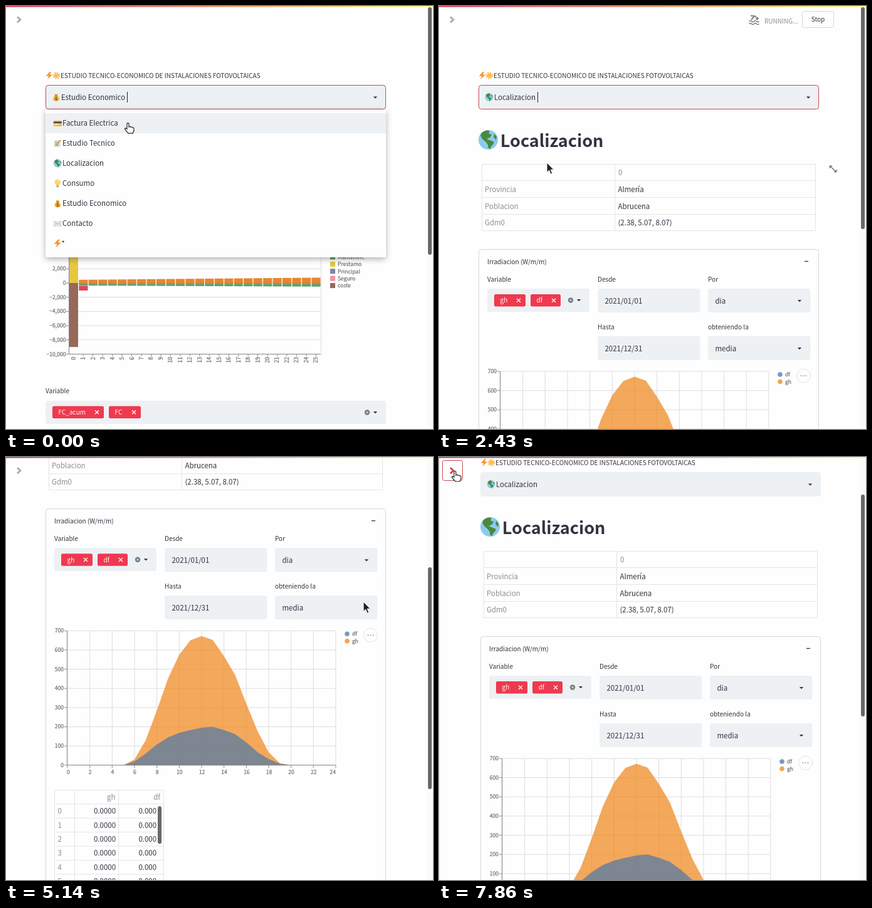
Write an HTML page that moves like this. It is 681 by 675 pixels and loops after 8000 ms.

```html
<!DOCTYPE html>
<html lang="es">
<head>
<meta charset="utf-8">
<title>Estudio</title>
<style>
html, body { margin: 0; width: 100%; height: 100%; overflow: hidden; background: #fefefe; }
svg { display: block; width: 681px; height: 675px; }
text { font: 11.46px "Noto Sans CJK JP", "Noto Sans CJK SC", "Noto Sans CJK KR", "Noto Sans", sans-serif; fill: #31333f; white-space: pre; }
.s { font-size: 10.03px; }
.h { font-size: 27px; font-weight: 700; }
.c { font-size: 8.6px; font-weight: 500; fill: #6a6a6a; stroke: #6a6a6a; stroke-width: .2px; }
.g { fill: #8b8c94; }
.w { fill: #fff; }
.e { text-anchor: end; }
.m { text-anchor: middle; }
</style>
</head>
<body>
<svg id="stage" viewBox="0 0 681 675" xmlns="http://www.w3.org/2000/svg"></svg>
<script>
const FIELD = '#edf1f3', RED = '#ef394f', FOCUS = '#cb4651', BLUE = '#4c78a8', ORANGE = '#f08519';

// ---- drawing helpers, all return markup ----
const text = (x, y, s, cls = '') => `<text x="${x}" y="${y}" class="${cls}">${s}</text>`;
const rect = (x, y, w, h, fill, more = '') => `<rect x="${x}" y="${y}" width="${w}" height="${h}" fill="${fill}" ${more}/>`;
const path = (d, stroke, w = 1, more = 'fill="none"') => `<path d="${d}" stroke="${stroke}" stroke-width="${w}" ${more}/>`;
const group = (id, body, more = '') => `<g id="${id}" ${more}>${body}</g>`;
const dot = (x, y, r, fill, more = '') => `<circle cx="${x}" cy="${y}" r="${r}" fill="${fill}" ${more}/>`;
const range = (n, f) => Array.from({ length: n }, (_, i) => f(i)).join('');
const caretDown = (x, y) => `<path d="M${x - 3.2} ${y - 1.6}h6.4l-3.2 3.4z" fill="#31333f"/>`;
const cross = (x, y, r, color, w) => path(`M${x - r} ${y - r}l${2 * r} ${2 * r}m0 ${-2 * r}l${-2 * r} ${2 * r}`, color, w);
const clear = (x, y) => dot(x, y, 4.2, '#777a82') + cross(x, y, 1.5, '#fff', 1);
const field = (x, y, w, h) => rect(x, y, w, h, FIELD, 'rx="3"');
const tag = (x, y, w, s) => rect(x, y, w, 19.5, RED, 'rx="2.5"') + text(x + 9.5, y + 13.3, s, 's w') + cross(x + w - 11, y + 9.8, 3, '#fff', 1.3);
const menu = (x, y) => dot(x, y, 11, '#fefefe', 'stroke="#e3e3e3"') + [-4, 0, 4].map(d => dot(x + d, y, 1.1, '#aaa')).join('');
const chartLegend = (x, y, names) => names.map((s, i) =>
  dot(x, y + i * 11.5, 3.8, i ? ORANGE : BLUE, 'opacity=".75"') + text(x + 8, y + i * 11.5 + 3, s, 'c')).join('');
const area = (pts, base, fill) =>
  `<path d="M${pts[0][0]} ${base}L${pts.map(p => p.map(v => v.toFixed(1)).join(' ')).join('L')}L${pts[pts.length - 1][0]} ${base}Z" fill="${fill}" opacity=".7"/>`;
const number = v => (v < 0 ? '−' : '') + Math.abs(v).toLocaleString('en-US');

// ---- pictograms on a 16 unit square ----
const icons = {
  bolt: '<path d="M9 0L1 9h6L4 16 15 6H9l3-6z" fill="#f7932b"/>',
  sun: dot(8, 8, 6.2, 'none', 'stroke="#f2a33a" stroke-width="2.6" stroke-dasharray="2.4 2.47"') + dot(8, 8, 4, '#fcc63c', 'stroke="#f2a33a"'),
  card: rect(0, 3, 16, 11, '#f3b544', 'rx="1.4"') + rect(0, 5, 16, 3, '#5a4238') + rect(2, 9.5, 8, 1.6, '#fff'),
  memo: rect(1, 2, 12, 13, '#d5dde1', 'rx="1"') + path('M3 6h8M3 9h7M3 12h8', '#7d98a8') + path('M5 12L14 2', '#f0922d', 2.6),
  globe: dot(8, 8, 8, '#8bcbee') + '<path d="M2.5 2.4Q6-.4 9 .5L8.5 3 11 3.6 9.5 6 6.8 7.2 9 8.3 12.5 9.6Q13 11.5 11 12.6L9.4 15.6Q7.6 15 7.7 12L5.7 9.6 3.2 7.4 1.6 4.6zM13 3l2 2.5-.6 2.6-2-2.4z" fill="#4b8a3b"/>',
  bulb: dot(8, 6, 5.8, '#fad96f') + rect(5.4, 10, 5.2, 2.4, '#f2c24c') + rect(5.6, 12.2, 4.8, 3.6, '#a3abb0', 'rx="1"'),
  bag: '<path d="M5 1l3 1 3-1-.8 4Q15 9 14 13q-1 3-6 3t-6-3Q1 9 5.800 5z" fill="#f0b541"/>' + path('M5 5h6', '#a5692b', 1.4) + path('M10 8.500Q6 7.500 6.200 9.500T9.700 12 6 13.500M8 7v8', '#7a4a22', 1.1),
  mail: rect(0, 3, 16, 11, '#dfe7eb', 'rx="1"') + path('M0 3.500L8 9.500 16 3.500M0 14L5.800 8M16 14L10.200 8', '#9db4c0')
};
const icon = (name, x, y, size) => `<g transform="translate(${x} ${y}) scale(${size / 16})">${icons[name]}</g>`;

// ---- page header ----
const selectBox = group('select', rect(63.5, 126.5, 542, 38, FIELD, 'id="frame" rx="4"') + caretDown(589, 146) +
  group('pickOld', icon('bag', 73.5, 139, 13) + text(87.9, 150, 'Estudio Economico')) +
  group('pickNew', icon('globe', 73.5, 139, 13) + text(87.9, 150, 'Localizacion')) +
  rect(0, 137, 1, 17, '#222', 'id="caret"'));
const header = icon('bolt', 63, 105, 12) + icon('sun', 74.500, 105, 12) +
  text(87, 115, 'ESTUDIO TECNICO-ECONOMICO DE INSTALACIONES FOTOVOLTAICAS', 's') + selectBox;

// ---- cash flow bars ----
const barY = v => 442 - v * .01135;
function barChart() {
  const step = 402 / 26;
  let out = range(10, i => {
    const v = 8000 - 2000 * i, y = barY(v);
    return path(`M100 ${y}H502`, '#ddd') + path(`M96 ${y}h4`, '#888') + text(95.5, y + 3, number(v), 'c e');
  });
  out += path('M502.500 351V555', '#ddd');
  out += range(26, i => {
    const x = 100.8 + i * step, w = 14.2, top = 437 - i * .14;
    const label = `<text class="c e" transform="translate(${x + 10} 560) rotate(-90)">${i}</text>`;
    if (!i) return rect(x, 401, w, 41, '#e6c743') + rect(x, 442, w, barY(-9000) - 442, '#97695a') + label;
    return rect(x, top, w, 442 - top, '#e8862f') + rect(x, 442, w, 1.8, '#8f8791') +
      rect(x, 443.8, w, 2.2 + i * .07, '#5ba065') + (i == 1 ? rect(x, 446.5, w, 7.5, '#e0455a') : '') +
      path(`M${x + 7} 555v4`, '#888') + label;
  });
  out += path('M100.500 351V555.500H502', '#888');
  const legend = { 'Mantenim.': '#54a24b', Prestamo: '#e8c53f', Principal: '#7f86a0', Seguro: '#f490a2', coste: '#97695a' };
  return out + Object.entries(legend).map(([s, c], i) =>
    rect(517, 396.5 + i * 11.4, 8, 8, c) + text(529, 403.7 + i * 11.4, s, 'c')).join('');
}

// ---- accumulated cash flow ----
function flowChart() {
  const X = i => 95.5 + i * 15.98, Y = v => 508 - v * .02683;
  const years = [...Array(26).keys()];
  const total = i => i ? -6150 + 250 * (i - 1) + 1.83 * (i - 1) ** 2 : -5400;
  const flow = i => i > 1 ? 200 - 6 * (i - 2) : i ? -750 : -5400;
  const lines = f => years.map(i => [X(i), Y(f(i))]);
  return range(9, i => {
    const v = 1000 - 1000 * i, y = Y(v);
    return path(`M95 ${y}H511`, '#ddd') + path(`M91 ${y}h4`, '#888') + text(90.5, y + 3, number(v), 'c e');
  }) + range(14, i => path(`M${X(2 * i)} 481V690`, '#ddd')) + path('M95.500 481V690', '#888') +
    area(lines(total), 508, ORANGE) + area(lines(flow), 508, BLUE) +
    chartLegend(530, 485.5, ['FC', 'FC_acum']) + menu(594.5, 487);
}
const flowPanel = text(63, 414, 'Variable', 's') + field(63, 426, 543, 37) + tag(74, 434.5, 82, 'FC_acum') +
  tag(164, 434.5, 51, 'FC') + clear(576, 444.5) + caretDown(589, 444.5) + flowChart();

// ---- location page ----
const place = icon('globe', 63, 198, 31) + text(97.8, 225, 'Localizacion', 'h') +
  path('M68.500 252.500H600.500V358.500H68.500zM68.500 278.500H600.500M68.500 305.500H600.500M68.500 332.500H600.500M280.500 252.500V358.500', '#e4e4e7') +
  text(286, 270, '0', 'g') +
  [['Provincia', 'Almería'], ['Poblacion', 'Abrucena'], ['Gdm0', '(2.38, 5.07, 8.07)']].map(([k, v], i) =>
    text(73, 297 + i * 26.6, k, 'g') + text(285.5, 297 + i * 26.6, v)).join('') +
  group('expand', path('M-4.500-4.500L4.500 4.500', '#777', 1.5) + '<path d="M-6-5.500h5l-5 5zM6 5.500h-5l5-5z" fill="#777"/>');

// ---- irradiation panel ----
const gh = [0, 0, 0, 0, 0, 0, 30, 130, 285, 452, 575, 650, 672, 652, 568, 470, 320, 178, 68, 10, 0];
const df = [0, 0, 0, 0, 0, 0, 20, 60, 108, 145, 168, 183, 195, 200, 183, 162, 118, 68, 32, 8, 0];
function sunChart() {
  const X = h => 98 + h * 17.83, Y = v => 797.5 - v * .3064;
  const curve = a => a.map((v, h) => [X(h), Y(v)]).slice(5);
  return range(8, i => path(`M98 ${Y(100 * i)}H526`, '#ddd') + path(`M93 ${Y(100 * i)}h4`, '#888') + text(92, Y(100 * i) + 3, 100 * i, 'c e')) +
    range(13, i => path(`M${X(2 * i)} 583V797`, '#ddd') + path(`M${X(2 * i)} 798v4`, '#888') +
      text(X(2 * i) + (i ? i > 11 ? 0 : .5 : -1), 812, 2 * i, 'c ' + (i ? i > 11 ? 'e' : 'm' : ''))) +
    path('M97.500 583V797.500H526', '#888') + area(curve(gh), 797.5, ORANGE) + area(curve(df), 797.5, BLUE) +
    chartLegend(544, 588, ['df', 'gh']) + menu(581.5, 590);
}
const hourTable = path('M77.500 837.500H251.500V1077M77.500 837.500V1077M109.500 837.500V1077M179.500 837.500V1077', '#e4e4e7') +
  text(174.5, 852.5, 'gh', 'g e') + text(246, 852.5, 'df', 'g e') +
  range(10, i => {
    const y = 859.500 + i * 22.4;
    return path(`M77.500 ${y}H251`, '#e4e4e7') + text(82.5, y + 15.5, i, 'g') +
      text(175, y + 15.5, gh[i].toFixed(4), 'e') + text(240, y + 15.5, df[i].toFixed(3), 'e');
  }) + rect(242, 863, 6, 60, '#686868', 'rx="3"');
const picker = (x, y, s, arrow) => field(x, y, 163.5, 38) + text(x + 11.5, y + 24, s) + (arrow ? caretDown(x + 146, y + 19.5) : '');
const sunPanel = rect(63.5, 388.5, 542, 702, 'none', 'rx="4" stroke="#d5d6da"') +
  text(77, 412, 'Irradiacion (W/m/m)', 's') + path('M583 407.500h6', '#31333f', 1.3) +
  text(77, 440, 'Variable', 's') + text(253, 440, 'Desde', 's') + text(429, 440, 'Por', 's') +
  text(253, 516, 'Hasta', 's') + text(429, 516, 'obteniendo la', 's') +
  field(77, 451, 163, 37) + tag(88, 460, 50, 'gh') + tag(146, 460, 48, 'df') + clear(210, 469.5) + caretDown(223, 469.5) +
  picker(253, 451, '2021/01/01') + picker(429, 451, 'dia', 1) + picker(253, 527, '2021/12/31') + picker(429, 527, 'media', 1) +
  sunChart() + hourTable;

// ---- dropdown ----
const options = [['card', 'Factura Electrica'], ['memo', 'Estudio Tecnico'], ['globe', 'Localizacion'], ['bulb', 'Consumo'],
  ['bag', 'Estudio Economico'], ['mail', 'Contacto'], ['bolt', '*']];
const list = rect(63, 165, 543, 236, '#fefefe', 'rx="3" style="filter:drop-shadow(0 3px 5px rgba(0,0,0,.3))"') +
  rect(63, 171, 543, 32, FIELD, 'id="mark"') +
  options.map(([n, s], i) => icon(n, 75.8, 180.5 + i * 32, 13) + text(s == '*' ? 88.5 : 90, 191 + i * 32, s)).join('');

// ---- fixed overlay ----
const running = group('stand', dot(502.5, 15, 2.2, '#808289') + path('M495 18.800H510M502.500 18V24', '#808289', 2.2) + path('M500.800 18V30.500M504.200 18V30.500', '#808289', 2)) +
  group('swim', dot(507.5, 20, 2.2, '#808289') + path('M497 15.500L503.500 16 506 18M503 16L498 22', '#808289', 2) +
    path('M494.500 24.500q2 -2 4 0t4 0t4 0t4 0M494.500 28.500q2 -2 4 0t4 0t4 0t4 0', '#808289', 1.6)) +
  text(519, 27.5, 'RUNNING...', 's g') + rect(579.5, 8.5, 50, 26, '#fefefe', 'rx="3" stroke="#d5d6da"') + text(604.5, 25, 'Stop', 's m');

stage.innerHTML = '<defs><linearGradient id="glow"><stop stop-color="#d8304f"/><stop offset="1" stop-color="#fffb86"/></linearGradient></defs>' +
  rect(0, 0, 681, 675, '#fefefe') +
  group('page', header +
    group('econ', icon('bag', 63, 198, 31) + text(97.8, 225, 'Estudio Economico', 'h') + barChart()) +
    group('flow', flowPanel) + group('place', place) + group('sun', sunPanel) + group('list', list)) +
  rect(0, 0, 0, 675, '#e9ecf1', 'id="side"') + group('run', running) +
  rect(5.5, 5.5, 32, 32, '#fefefe', `id="hover" rx="3" stroke="${FOCUS}"`) +
  path('M18 17.200L23 21.700 18 26.200', '#a6a7ac', 2.6, 'id="chevron" fill="none"') +
  rect(0, 0, 681, 1.6, 'url(#glow)') + rect(672, 2, 9, 673, '#fafafa') + rect(673, 2, 6, 354, '#686868', 'id="thumb" rx="3"') +
  group('arrow', path('M0 0V15.500L3.600 12.200 6.100 18.200 8.700 17.100 6.200 11.200H11Z', '#fff', 1, 'fill="#222"')) +
  group('hand', path('M4 1.500Q5.500-.500 7 1.500V7Q9 5.600 9.800 7.300 11.800 6.300 12.400 8 15 7.400 15 9.800V13L13.200 17H6L1 11.200Q-.300 9 2 8.800L4 10.200Z', '#222', 1.2, 'fill="#fff"'));

// ---- motion ----
const pointer = [[0, 194, 186], [571, 182, 222], [857, 174, 262], [1000, 172, 250], [2571, 172, 250], [2714, 196, 268], [2857, 196, 268],
  [3000, 471, 313], [3143, 471, 313], [3286, 520, 280], [3429, 570, 254], [3571, 570, 254], [4286, 571, 239], [4571, 570, 231],
  [5571, 570, 231], [6000, 285, 205], [6143, 261, 202], [6286, 261, 202], [6429, 323, 199], [7286, 30, 30], [7429, 25, 22]];
const scroll = [[4286, 0], [4429, 150], [4571, 408], [4857, 408], [5143, 306], [5286, 204], [5429, 102]];
const grow = [[4000, 1], [4350, 0], [5571, 0], [5857, 1], [6857, 1], [7143, 0]];
const slide = [[7571, 0], [7714, 1], [7857, 3]];

function at(keys, t, k = 1) {
  const i = keys.findIndex(key => key[0] > t);
  if (i < 0) return keys[keys.length - 1][k];
  if (!i) return keys[0][k];
  const [a, b] = [keys[i - 1], keys[i]];
  return a[k] + (b[k] - a[k]) * (t - a[0]) / (b[0] - a[0]);
}
const $ = id => document.getElementById(id);
const show = (id, on) => $(id).style.display = on ? '' : 'none';
const set = (id, name, v) => $(id).setAttribute(name, v);

function draw(now) {
  // the screen refreshes seven times a second
  const ms = now % 8000, t = Math.min(55, Math.floor((ms + 5) * .007)) * 1000 / 7 + .5;
  const x = at(pointer, t), y = at(pointer, t, 2), top = at(scroll, t), dx = at(slide, t);
  const open = t < 1280, old = t < 1570, loaded = t > 2140, over = t > 7280, focus = t < 7570;
  set('page', 'transform', `translate(${dx} ${-top})`);
  show('list', open);
  show('pickOld', open);
  show('pickNew', !open);
  show('econ', old);
  show('flow', !loaded);
  set('flow', 'transform', `translate(0 ${old ? 204 : 0})`);
  show('place', !old);
  show('sun', loaded);
  set('mark', 'y', 171 + 32 * Math.max(0, Math.floor((Math.min(y, 266) - 171) / 32)));
  set('frame', 'stroke', focus ? FOCUS : FIELD);
  show('caret', focus && !(t > 500 && t < 1000));
  set('caret', 'x', open ? 193 : 157);
  set('expand', 'transform', `translate(628.5 260) scale(${at(grow, t)})`);
  show('run', !old && t < 2710);
  show('stand', !loaded);
  show('swim', loaded);
  show('hover', over);
  set('chevron', 'stroke', over ? '#d8384c' : '#a6a7ac');
  set('side', 'width', dx * .5);
  set('thumb', 'y', 2 + top * .569);
  set('thumb', 'height', old ? 395 : loaded ? 354 : 489);
  show('hand', open || over);
  show('arrow', !open && !over);
  set('hand', 'transform', `translate(${x - 5} ${y})`);
  set('arrow', 'transform', `translate(${x} ${y})`);
}
const start = performance.now();
function loop() {
  draw(performance.now() - start);
  requestAnimationFrame(loop);
}
loop();
</script>
</body>
</html>
```
